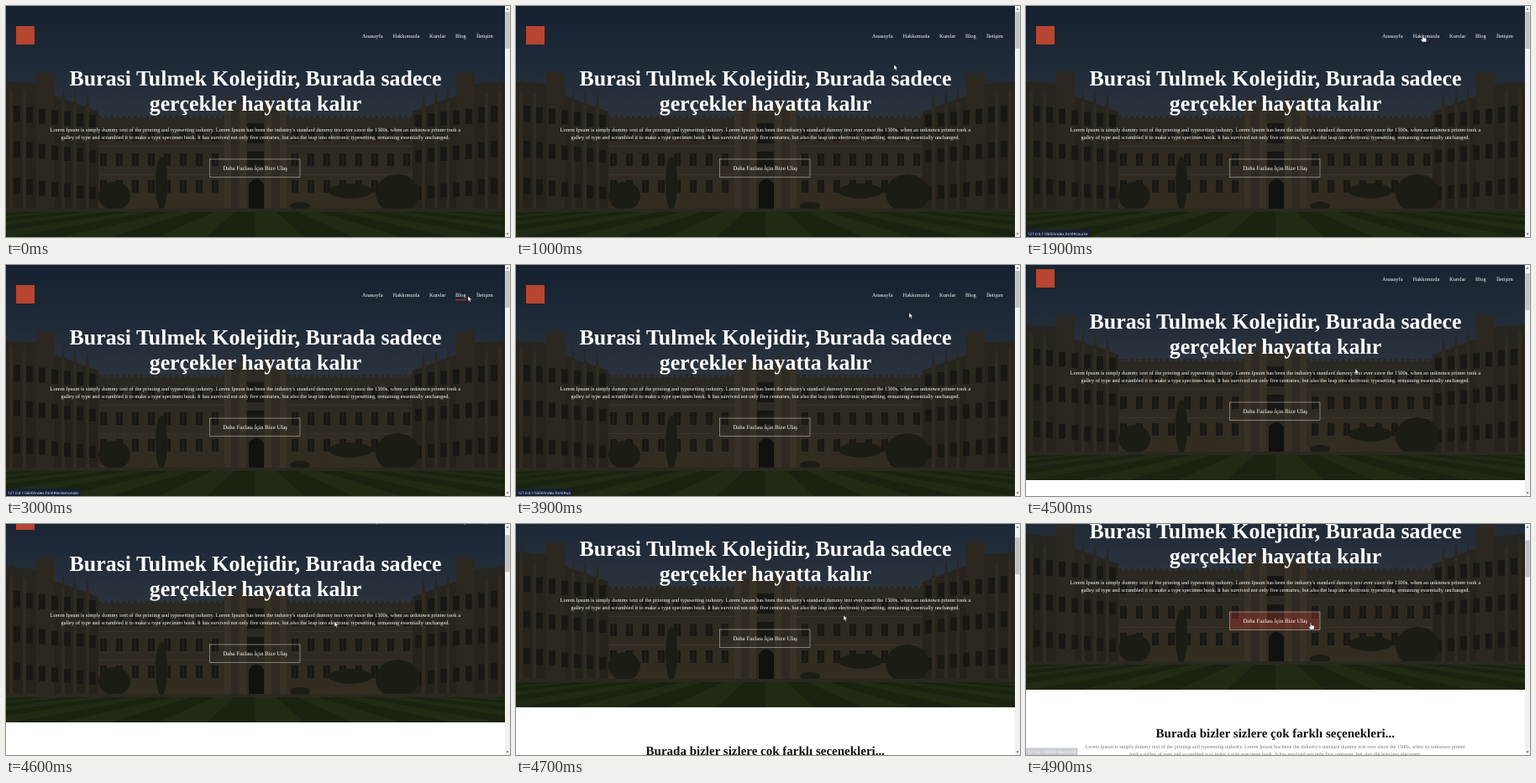
Animation, 600 px wide and 276 px high, one loop 5 s. Source, as an HTML page:

```html
<!DOCTYPE html>
<html lang="tr">
<head>
<meta charset="utf-8">
<title>Kolej</title>
<style>
  html, body { margin: 0; width: 100%; height: 100%; overflow: hidden; background: #fff; }
  svg { display: block; width: 600px; height: 276px; }
  text { font-family: "Liberation Serif", "Times New Roman", serif; text-rendering: geometricPrecision; white-space: pre; }
  .mid { text-anchor: middle; }
  .bold { font-weight: bold; }
  #status text { font-family: "Open Sans", "Noto Sans", sans-serif; }
</style>
</head>
<body>
<svg viewBox="0 0 600 276">
  <defs>
    <linearGradient id="sky" x2="0" y2="1">
      <stop offset="0" stop-color="#162130"/>
      <stop offset=".28" stop-color="#202b39"/>
      <stop offset=".5" stop-color="#2c343d"/>
    </linearGradient>
    <linearGradient id="stone" x2="0" y2="1">
      <stop offset="0" stop-color="#2b2822"/>
      <stop offset="1" stop-color="#342d20"/>
    </linearGradient>
    <linearGradient id="wing" x2="0" y2="1">
      <stop offset="0" stop-color="#27251f"/>
      <stop offset="1" stop-color="#26221a"/>
    </linearGradient>
    <clipPath id="lawn"><path d="M0 246H594V276H0Z"/></clipPath>
  </defs>
  <g id="page">
    <rect width="594" height="276" fill="url(#sky)"/>
    <g id="scene"></g>
    <rect x="12" y="24" width="22" height="22" fill="#b8452f"/>
    <g id="copy" fill="#fff"></g>
    <rect id="fill" x="242.5" y="183" width="107.5" height="21.5" fill="#f44336"/>
    <rect x="242.5" y="183" width="107.5" height="21.5" fill="none" stroke="#fff" stroke-width=".4"/>
    <g id="label" fill="#fff"></g>
    <g id="lines" fill="#f41f1f"></g>
    <g id="below"></g>
  </g>
  <rect x="594" width="6" height="276" fill="#f1f1f1"/>
  <path d="M595.5 4.5L597 2.5L598.5 4.5ZM595.5 271.5L597 273.5L598.5 271.5Z" fill="#555"/>
  <rect id="thumb" x="594.4" width="5.2" height="44" fill="#c1c1c1"/>
  <g id="status">
    <rect y="267.5" height="8.5" fill="#14203a"/>
    <text x="2" y="273.5" font-size="4.5" fill="#fff"></text>
  </g>
  <g id="cursor" fill="#fff" stroke="#111" stroke-width=".4" stroke-linejoin="round">
    <path id="arrow" d="M0 0V6.2L1.4 5L2.4 7.2L3.4 6.8L2.5 4.6L4.4 4.5Z"/>
    <path id="hand" d="M-.7.4Q0-.5.7.4V3L3.6 3.6Q4.5 3.9 4.3 5L3.7 8H-.4L-2.5 5.2Q-2.6 4.2-1.6 4.5L-.7 5.2Z"/>
  </g>
</svg>
<script>
const $ = id => document.getElementById(id);
const clamp = v => Math.max(0, Math.min(1, v));
const text = (str, x, y, size, cls = "mid", color = "") =>
  `<text x="${x}" y="${y}" font-size="${size}" class="${cls}"${color && ` fill="${color}"`}>${str}</text>`;
const box = (x, y, w, h, color) => `<rect x="${x}" y="${y}" width="${w}" height="${h}" fill="${color}"/>`;
const shape = (d, color) => `<path d="${d}" fill="${color}"/>`;

// College court: main range, gate tower, two wings and a striped lawn
function drawScene() {
  const dark = "#181713";
  let s = box(95, 134, 404, 111, "url(#stone)");
  for (let x = 96; x < 498; x += 7) s += box(x, 131, 4, 4, "#2b2822");
  s += box(95, 167, 404, 1, "#3a3428") + box(95, 201, 404, 1, "#3a3428");
  for (let x = 112; x < 488; x += 19)
    for (const y of [146, 176, 208]) s += box(x, y, 8, 15, dark) + box(x + 3.7, y, .7, 15, "#322c22");

  s += box(264, 122, 66, 123, "#2f2a21");
  for (const x of [260, 278, 308, 326])
    s += box(x, 116, 8, 129, "#383126") + shape(`M${x} 116l4-9 4 9Z`, "#302b24");
  s += box(287, 140, 20, 24, dark) + box(287, 174, 20, 20, dark);
  s += shape("M289 244V213Q298 200 307 213V244Z", "#11110f");

  for (const side of [0, 1]) {
    let w = shape("M0 90L36 93V106L60 108L110 126V245L0 256Z", "url(#wing)");
    for (const x of [4, 20, 66, 80, 95])
      w += box(x, 100 + x * .22, 4, 145 - x * .22, "#302b22") + shape(`M${x} ${100 + x * .22}l2-18 2 18Z`, "#2a2721");
    w += box(36, 82, 22, 166, "#2c2820");
    for (let x = 36; x < 58; x += 6) w += box(x, 78, 4, 5, "#2c2820");
    for (let x = 9; x < 100; x += 15)
      for (const y of [118, 160, 204]) w += box(x, y + x * .12, 8, 20 - x * .05, dark);
    s += `<g transform="${side ? "translate(594 0) scale(-1 1)" : ""}">${w}</g>`;
  }

  for (const [x, y, rx, ry] of [[129, 227, 19, 17], [185, 212, 7, 32], [466, 224, 26, 23], [410, 221, 26, 9], [350, 239, 12, 5]])
    s += `<ellipse cx="${x}" cy="${y}" rx="${rx}" ry="${ry}" fill="#1b1d14"/>`;
  s += box(0, 242, 594, 5, "#2a291f") + box(0, 246, 594, 30, "#1a2210");
  let stripes = "";
  for (let i = -12; i < 12; i += 2)
    stripes += `M${297 + i * 25} 246h25L${297 + (i + 1) * 58} 276h-58Z`;
  return s + `<g clip-path="url(#lawn)">${shape(stripes, "#212b14")}</g>`;
}

const links = [
  // label, left, width, hover start, hover end
  ["Anasayfa", 424, 25, 1200, 1450],
  ["Hakkımızda", 460.5, 31.5, 1850, 2150],
  ["Kurslar", 504, 20, 2200, 2500],
  ["Blog", 535, 13, 2500, 3050],
  ["İletişim", 560, 20, 3100, 3500]
];
const lorem = "Lorem Ipsum is simply dummy text of the printing and typesetting industry. Lorem Ipsum has been the industry's standard dummy text ever since the 1500s, when an unknown printer";
const galley = "galley of type and scrambled it to make a type specimen book. It has survived not only five centuries, but also the leap into electronic";

$("scene").innerHTML = drawScene();
$("copy").innerHTML =
  links.map(([label, x]) => text(label, x, 38.4, 6.5, "")).join("") +
  text("Burasi Tulmek Kolejidir, Burada sadece", 297, 95.4, 25.9, "mid bold") +
  text("gerçekler hayatta kalır", 297, 125.2, 25.9, "mid bold") +
  text(lorem + " took a", 296.8, 150.2, 6.45) +
  text(galley + " typesetting, remaining essentially unchanged.", 296.8, 158.8, 6.45);
$("label").innerHTML = text("Daha Fazlası İçin Bize Ulaş", 296.6, 196, 6.9);
$("lines").innerHTML = links.map(() => '<rect y="41.2" height="1"/>').join("");
$("below").innerHTML = box(0, 276, 594, 200, "#fff") +
  text("Burada bizler sizlere çok farklı seçenekleri...", 296.8, 332.7, 15, "mid bold", "#111") +
  text(lorem, 296.8, 346.2, 6.2, "mid", "#777") +
  text("took a " + galley, 296.8, 354.8, 6.2, "mid", "#777");

const path = [
  [700, 445, 118], [1000, 450, 70], [1200, 446, 42], [1300, 437, 37], [1450, 446, 41], [1800, 448, 43],
  [1900, 472.5, 35], [2150, 490, 36], [2250, 512, 36], [2450, 518, 36], [2600, 539, 37], [3000, 550, 37],
  [3150, 565, 37], [3400, 567, 37], [3600, 566, 42], [3700, 540, 45], [3900, 468, 57], [4200, 415, 85],
  [4500, 392, 124], [4700, 390, 109], [4800, 365, 112], [4900, 339, 118]
];
const scrolls = [[4300, 0], [4400, 4], [4500, 19], [4600, 39], [4700, 57], [4800, 70], [4900, 78]];
const hints = [[0, null], [1250, ""], [1850, "course"], [2200, "facilities"], [2500, "testemonials"], [3100, "ua"], [4100, null], [4850, ""]];

function along(keys, t) {
  const i = keys.findIndex(k => k[0] > t);
  if (i === 0) return keys[0].slice(1);
  if (i < 0) return keys[keys.length - 1].slice(1);
  const a = keys[i - 1], b = keys[i], p = (t - a[0]) / (b[0] - a[0]);
  return a.slice(1).map((v, j) => v + (b[j + 1] - v) * p);
}

const statusBox = document.querySelector("#status rect");
const statusText = document.querySelector("#status text");

function draw(t) {
  const [scroll] = along(scrolls, t);
  $("page").setAttribute("transform", `translate(0 ${-scroll})`);
  $("thumb").setAttribute("y", 7 + scroll * .16);

  links.forEach(([, x, w, start, end], i) => {
    const p = clamp(clamp((Math.min(t, end) - start) / 500) - Math.max(0, t - end) / 500);
    const line = $("lines").children[i];
    line.setAttribute("x", x + w * (1 - p) / 2);
    line.setAttribute("width", w * p);
  });
  $("fill").setAttribute("opacity", t >= 4900 ? .24 : 0);

  const hint = hints.filter(h => h[0] <= t).pop()[1];
  $("status").setAttribute("opacity", hint === null ? 0 : t >= 4850 ? .22 : 1);
  statusText.textContent = "127.0.0.1:5500/index.html#" + (hint || "");
  statusBox.setAttribute("width", statusText.getComputedTextLength() + 4);

  const [x, y] = along(path, t);
  const hand = t >= 4900 || y < 42 && links.some(l => x >= l[1] && x <= l[1] + l[2]);
  $("cursor").setAttribute("transform", `translate(${x} ${y})`);
  $("cursor").setAttribute("opacity", t < 700 ? 0 : 1);
  $("hand").setAttribute("opacity", hand ? 1 : 0);
  $("arrow").setAttribute("opacity", hand ? 0 : 1);
}

function tick() {
  draw(Math.floor(performance.now() % 5000 / 100) * 100);
  requestAnimationFrame(tick);
}
tick();
</script>
</body>
</html>
```
